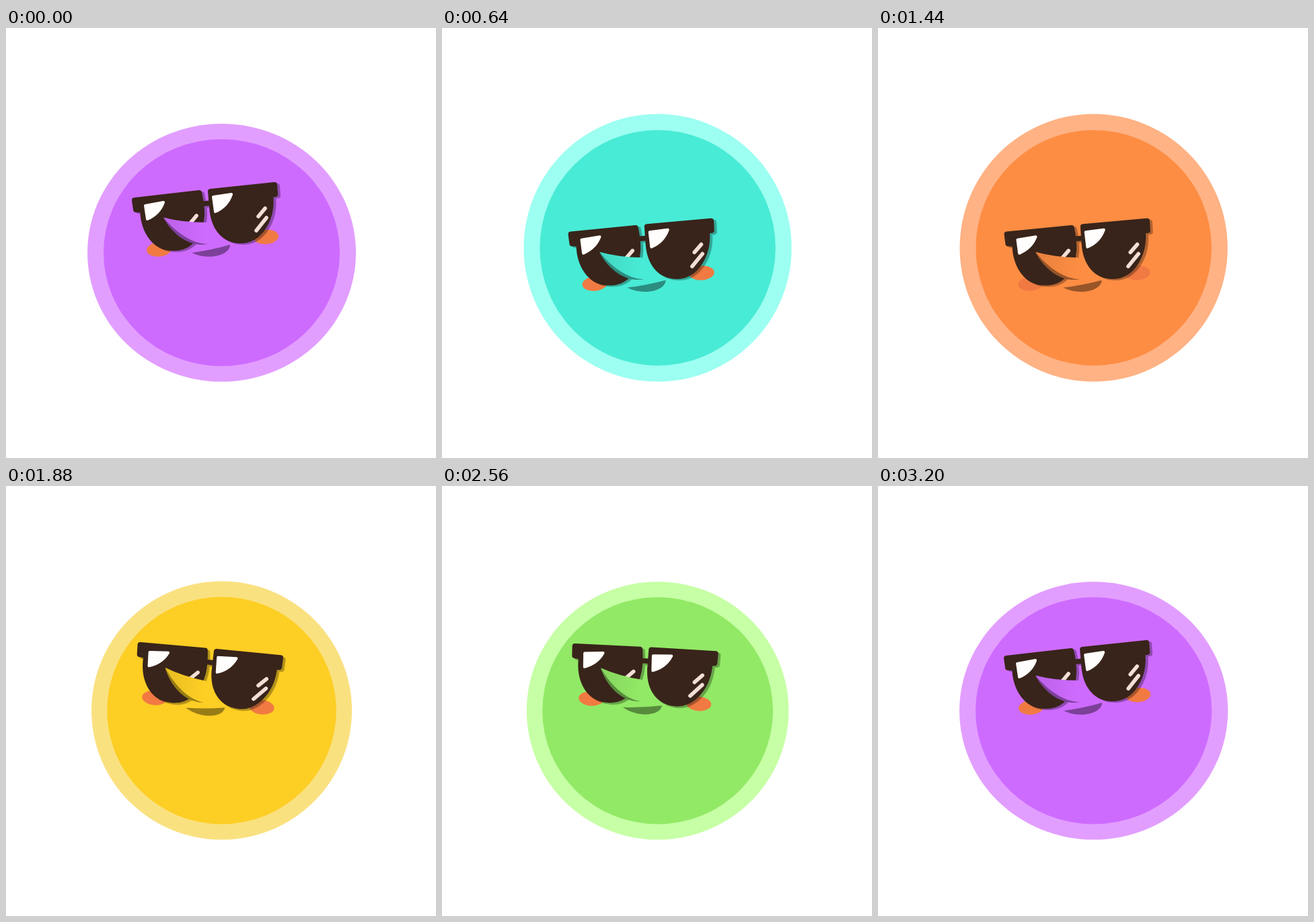
Write an HTML page with a canvas that moves like this. It is 639 px wide and 639 px high and loops after 3.24 s.

```html
<!DOCTYPE html>
<html lang="en">
<head>
<meta charset="utf-8">
<title>Cool face</title>
<style>
html, body { margin: 0; width: 100%; height: 100%; overflow: hidden; background: #fff; }
canvas { display: block; width: 639px; height: 639px; }
</style>
</head>
<body>
<canvas width="639" height="639"></canvas>
<script>
const ctx = document.querySelector('canvas').getContext('2d');
const STEP = 40, FRAMES = 81, BEAT = 10;

// Each skin: face colour, rim colour
const purple = [[206, 107, 255], [226, 158, 255]];
const lime = [[170, 233, 67], [212, 255, 141]];
const teal = [[64, 235, 225], [151, 255, 249]];
const gold = [[253, 209, 35], [250, 227, 128]];
const orange = [[253, 135, 70], [255, 174, 132]];

// One key per beat
const skins = [purple, lime, teal, gold, orange, gold, teal, lime, purple];
const nods = [0, 0, 1, 0, 1, 0, 0, 0, 0];
const turns = [0, 1, 0, 1, 0, 1, 0, 1, 0];

const DARK = '#38241a', SHADE = 'rgba(0,0,0,.4)';
const path = d => new Path2D(d);
const lenses = path('M191 256L287 245Q291 262 291 277C290 305 275 327 250 327C222 329 204 303 203 270L193 270Z' +
  'M304 243L399 233L400 247L393 248C397 282 378 316 350 316C325 317 308 298 306 266Z');
const bridge = path('M290 261.5L304 260');
const glints = path('M207 264L234 259Q228 276 210 284ZM308 251L335 247Q329 265 311 273Z');
const streaks = path('M375 280L385 268M372 301L387 282M273 291L283 279M270 312L285 293');
const noseShade = path('M234 282C246 305 272 327 300 321L280 308Z');
const nose = path('M234 281.5Q262 289 298 289L300 321C278 321 253 305 234 281.5Z');
const mouth = path('M276 334Q305 330 333 322C333 338 300 346 276 334Z');

const mix = (a, b, k) => a + (b - a) * k;
const rgb = c => `rgb(${c.map(Math.round)})`;
const darker = (c, k) => rgb(c.map(v => v * k));

// cubic-bezier(.33, 0, 0, 1)
function ease(x) {
  let lo = 0, hi = 1;
  for (let i = 0; i < 30; i++) {
    const s = (lo + hi) / 2;
    if (.99 * (1 - s) ** 2 * s + s ** 3 < x) lo = s; else hi = s;
  }
  return lo * lo * (3 - 2 * lo);
}

function ellipse(x, y, rx, ry, fill, angle = 0) {
  ctx.fillStyle = fill;
  ctx.beginPath();
  ctx.ellipse(x, y, rx, ry, angle, 0, 2 * Math.PI);
  ctx.fill();
}

function solid(shape, color, width) {
  ctx.fillStyle = ctx.strokeStyle = color;
  ctx.lineWidth = width;
  ctx.fill(shape);
  ctx.stroke(shape);
}

function line(shape, color, width) {
  ctx.strokeStyle = color;
  ctx.lineWidth = width;
  ctx.stroke(shape);
}

function glasses(color) {
  solid(lenses, color, 8);
  line(bridge, color, 7.5);
}

function draw(frame) {
  const beat = Math.floor(frame / BEAT) % 8;
  const k = ease(frame % BEAT / BEAT);
  const at = keys => mix(keys[beat], keys[beat + 1], k);
  const [skin, rim] = [0, 1].map(i => skins[beat][i].map((v, j) => mix(v, skins[beat + 1][i][j], k)));
  const nod = at(nods), turn = at(turns);

  ctx.setTransform(1, 0, 0, 1, 0, 0);
  ctx.fillStyle = '#fff';
  ctx.fillRect(0, 0, 639, 639);

  // Head squashes towards its base
  const rx = mix(199.5, 193.3, turn), ry = mix(191.7, 199.5, nod);
  const cy = 525.6 - ry;
  ellipse(320.5, cy, rx, ry, rgb(rim));
  ellipse(320.5, cy, rx * .88, ry * .88, rgb(skin));

  ctx.translate(304, 287 + 56.5 * nod);
  ctx.rotate(turn * 12.05 * Math.PI / 180);
  ctx.translate(-304, -287);
  ctx.lineJoin = ctx.lineCap = 'round';

  ellipse(227.5, 329, 18.5, 10.7, '#f17a42', -.1);
  ellipse(386.5, 310.5, 18.5, 10.7, '#f17a42', -.1);

  // Cast shadow is flattened to one tone by clipping the overlaps
  ctx.save();
  ctx.translate(4, 2);
  solidShadow();
  ctx.restore();

  glasses(DARK);
  solid(glints, '#fffefc', 4);
  line(streaks, '#f3dfd6', 5.6);

  ctx.fillStyle = darker(skin, .6);
  ctx.fill(noseShade);
  const tone = ctx.createLinearGradient(234, 0, 296, 0);
  tone.addColorStop(0, darker(skin, .91));
  tone.addColorStop(1, rgb(skin));
  ctx.fillStyle = tone;
  ctx.fill(nose);
  ctx.fillStyle = SHADE;
  ctx.fill(mouth);
}

// Shadow drawn off stage so that fill and outline merge evenly
const layer = document.createElement('canvas');
layer.width = layer.height = 639;
const pen = layer.getContext('2d');
pen.lineJoin = pen.lineCap = 'round';
pen.lineWidth = 8;
pen.fill(lenses);
pen.stroke(lenses);
pen.stroke(bridge);
function solidShadow() {
  ctx.globalAlpha = .3;
  ctx.drawImage(layer, 0, 0);
}

const start = performance.now();
function tick() {
  draw(Math.floor((performance.now() - start) / STEP) % FRAMES);
  requestAnimationFrame(tick);
}
tick();
</script>
</body>
</html>
```
